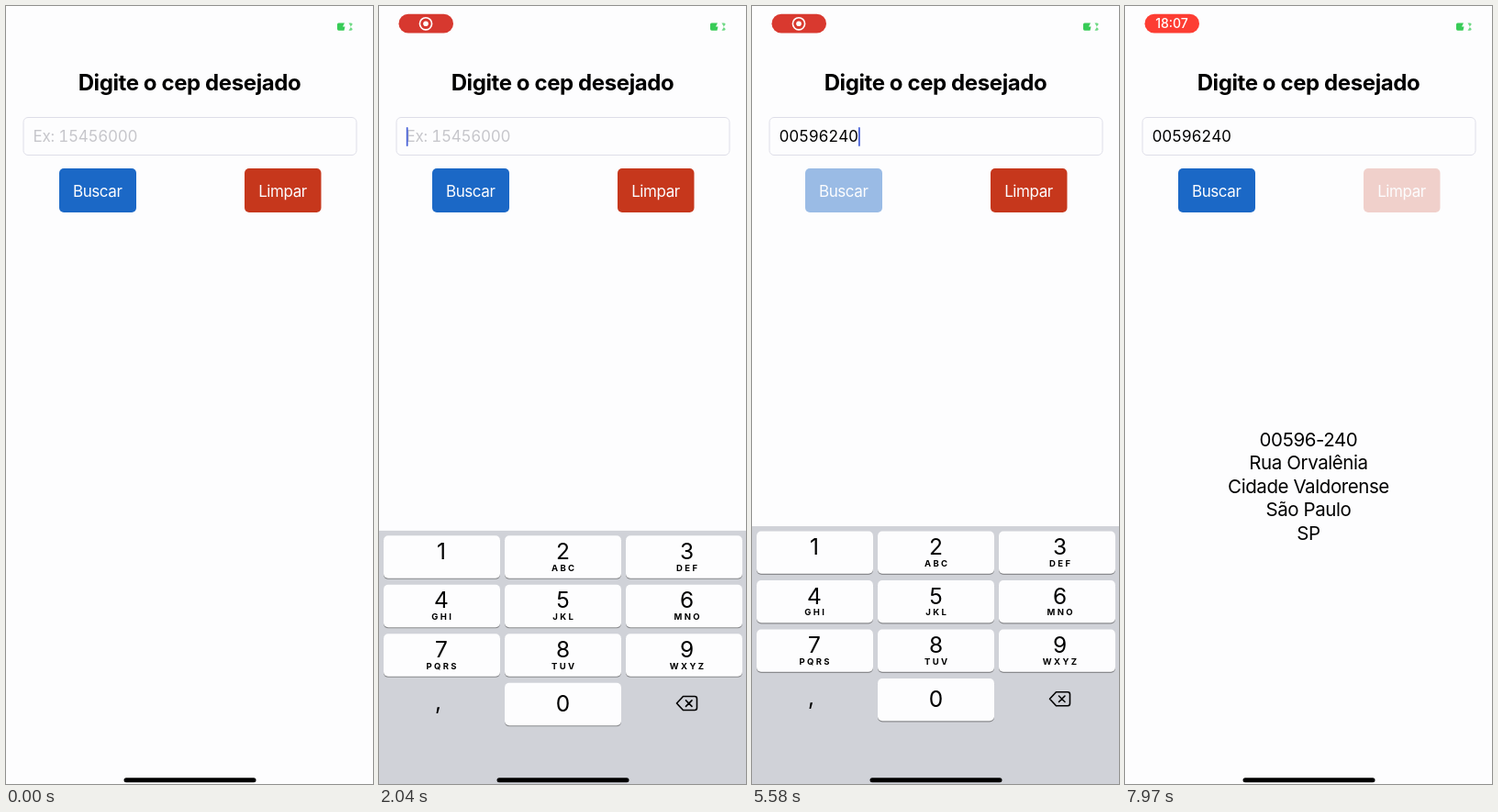
Write an HTML page that moves like this. It is 400 px wide and 848 px high and loops after 8000 ms.

```html
<!DOCTYPE html>
<html lang="pt-BR">
<head>
<meta charset="utf-8">
<title>Busca de CEP</title>
<style>
  html, body { margin: 0; width: 100%; height: 100%; overflow: hidden; background: #fdfdfe; }
  svg { display: block; width: 100%; height: 100%; font-family: Inter, Roboto, sans-serif; }
  .mid { text-anchor: middle; }
  .title { font-size: 24px; font-weight: 700; letter-spacing: -.4px; }
  .field { font-size: 17px; letter-spacing: -.25px; font-variant-numeric: tabular-nums; }
  .button text { font-size: 17px; letter-spacing: -.4px; fill: #fcfcfe; }
  .result { font-size: 20.5px; letter-spacing: -.42px; }
  .digit { font-size: 24.5px; }
  .letters { font-size: 9.5px; font-weight: 700; letter-spacing: 2.4px; }
  .clock { font-size: 14px; font-weight: 500; }

  #pill, #pillShape, #record, .clock, #search, #clear { animation: 8s linear infinite both; }
  #pill { animation-name: appear; }
  #pillShape { animation-name: pulse; animation-timing-function: ease-in-out; }
  #record { animation-name: recordOut; }
  .clock { animation-name: clockIn; }
  #search { animation-name: searchPress; animation-timing-function: ease-in-out; }
  #clear { animation-name: clearPress; animation-timing-function: ease-in-out; }

  @keyframes appear { 0%, 3.7% { opacity: 0 } 8.7%, 100% { opacity: 1 } }
  @keyframes pulse {
    0% { fill: #f63c32 } 21.1%, 76.1% { fill: #d5382f } 48.6%, 100% { fill: #fd3d33 }
  }
  @keyframes recordOut { 0%, 75.5% { opacity: 1 } 81% { opacity: 0 } 100% { opacity: 0 } }
  @keyframes clockIn { 0%, 74.5% { opacity: 0 } 81% { opacity: 1 } 100% { opacity: 1 } }
  @keyframes searchPress { 0%, 66.5% { opacity: 1 } 71.75% { opacity: .2 } 80.5%, 100% { opacity: 1 } }
  @keyframes clearPress { 0%, 95% { opacity: 1 } 99.6%, 100% { opacity: .22 } }
</style>
</head>
<body>
<svg viewBox="0 0 400 848">
  <rect width="400" height="848" fill="#fdfdfe"/>

  <g id="pill">
    <rect id="pillShape" x="21.5" y="8.8" width="59.5" height="20.8" rx="10.4"/>
    <g id="record" fill="#fff">
      <circle cx="51" cy="19.3" r="6.6" fill="none" stroke="#fff" stroke-width="1.6"/>
      <circle cx="51" cy="19.3" r="2.8"/>
    </g>
    <text class="clock mid" x="51" y="24.2" fill="#fff">18:07</text>
  </g>

  <path d="M362.5 18.5H369L367 22.5H369.5L368.5 26.7H362.5Q361 26.7 361 25V20Q361 18.5 362.5 18.5Z" fill="#38cc57"/>
  <path d="M373.5 18.5H376Q377.7 18.5 377.7 20L375.5 22.7L377.7 25Q377.7 26.7 376 26.7H373.5L376 22.7Z" fill="#6fd985"/>

  <text class="title mid" x="200" y="92">Digite o cep desejado</text>

  <rect x="19" y="121.5" width="363" height="41" rx="5" fill="none" stroke="#dedee8"/>
  <text id="hint" class="field" x="29.5" y="148.3" fill="#c6c6cb">Ex: 15456000</text>
  <text id="typed" class="field" x="29.5" y="148.3"></text>
  <rect id="caret" y="132" width="1.8" height="21" rx=".9" fill="#4a63d8"/>

  <g id="search" class="button">
    <rect x="58" y="177" width="84" height="48" rx="5" fill="#1b68c6"/>
    <text class="mid" x="99.7" y="207.8">Buscar</text>
  </g>
  <g id="clear" class="button">
    <rect x="260" y="177" width="83.5" height="48" rx="5" fill="#c6371c"/>
    <text class="mid" x="301.5" y="207.8">Limpar</text>
  </g>

  <g id="result"></g>
  <g id="keyboard"><rect width="400" height="300" fill="#d0d2d8"/></g>
  <rect x="128.5" y="841.2" width="144" height="5" rx="2.5"/>
</svg>
<script>
const LOOP = 8000;
const CODE = '00596240';
const TYPE_TIMES = [3160, 3450, 3720, 4000, 4270, 4520, 4790, 5060];
const ADDRESS = ['00596-240', 'Rua Orvalênia', 'Cidade Valdorense', 'São Paulo', 'SP'];
const KEY_LETTERS = ['', 'ABC', 'DEF', 'GHI', 'JKL', 'MNO', 'PQRS', 'TUV', 'WXYZ'];
const KEY_COLOR = '#fdfdfe', PRESSED_COLOR = '#b0bcc8';
const FOCUS = 1140, BLUR = 5740, RESULT = 5980;
const KEYBOARD_HEIGHT = 281;
const LABEL_X = [68, 200.5, 335.5];

const el = id => document.getElementById(id);
const [hint, typed, caret, result, keyboard] =
  ['hint', 'typed', 'caret', 'result', 'keyboard'].map(el);

function keyMarkup(digit, col, row, letters) {
  const x = 5 + col * 132, y = 5.5 + row * 53.5, cx = LABEL_X[col];
  const baseline = y + (digit ? 25.6 : 31.3);
  return `<rect x="${x}" y="${y + 1.2}" width="127" height="46.3" rx="5" fill="#898a8d"/>
    <rect id="key${digit}" x="${x}" y="${y}" width="127" height="46.3" rx="5" fill="${KEY_COLOR}"/>
    <text class="digit mid" x="${cx}" y="${baseline}">${digit}</text>
    <text class="letters mid" x="${cx + 1.2}" y="${y + 38.4}">${letters}</text>`;
}

keyboard.innerHTML +=
  KEY_LETTERS.map((letters, i) => keyMarkup(i + 1, i % 3, Math.floor(i / 3), letters)).join('') +
  keyMarkup(0, 1, 3, '') +
  `<text class="digit mid" x="64.5" y="195">,</text>
   <path d="M331.5 180.7H344Q346.5 180.7 346.5 183.2V193.2Q346.5 195.7 344 195.7H331.5L324.5 188.2Z
     M334.5 185L341 191.5M341 185L334.5 191.5"
     fill="none" stroke="#000" stroke-width="1.6" stroke-linejoin="round" stroke-linecap="round"/>`;

result.innerHTML = ADDRESS.map((line, i) =>
  `<text class="result mid" x="200" y="${479.5 + i * 25.5}">${line}</text>`).join('');

// Critically damped spring from 0 to 1.
function spring(ms) {
  const p = Math.max(0, ms) * 0.00667;
  return 1 - (1 + p) * Math.exp(-p);
}

const show = (node, visible) => node.setAttribute('visibility', visible ? 'visible' : 'hidden');

function draw(t) {
  const raised = t < BLUR ? spring(t - FOCUS) : 1 - spring(t - BLUR);
  keyboard.setAttribute('transform', `translate(0 ${848 - KEYBOARD_HEIGHT * raised})`);

  const count = TYPE_TIMES.filter(time => t >= time).length;
  typed.textContent = CODE.slice(0, count);
  show(hint, count === 0);
  show(caret, t >= FOCUS && t < BLUR);
  caret.setAttribute('x', 29.8 + (count ? typed.getComputedTextLength() : 0));

  const pressed = CODE[TYPE_TIMES.findIndex(time => t >= time - 160 && t < time + 20)];
  for (let d = 0; d < 10; d++)
    el('key' + d).setAttribute('fill', String(d) === pressed ? PRESSED_COLOR : KEY_COLOR);

  show(result, t >= RESULT);
}

let start;
function tick(now) {
  start ??= now;
  draw((now - start) % LOOP);
  requestAnimationFrame(tick);
}
draw(0);
requestAnimationFrame(tick);
</script>
</body>
</html>
```
